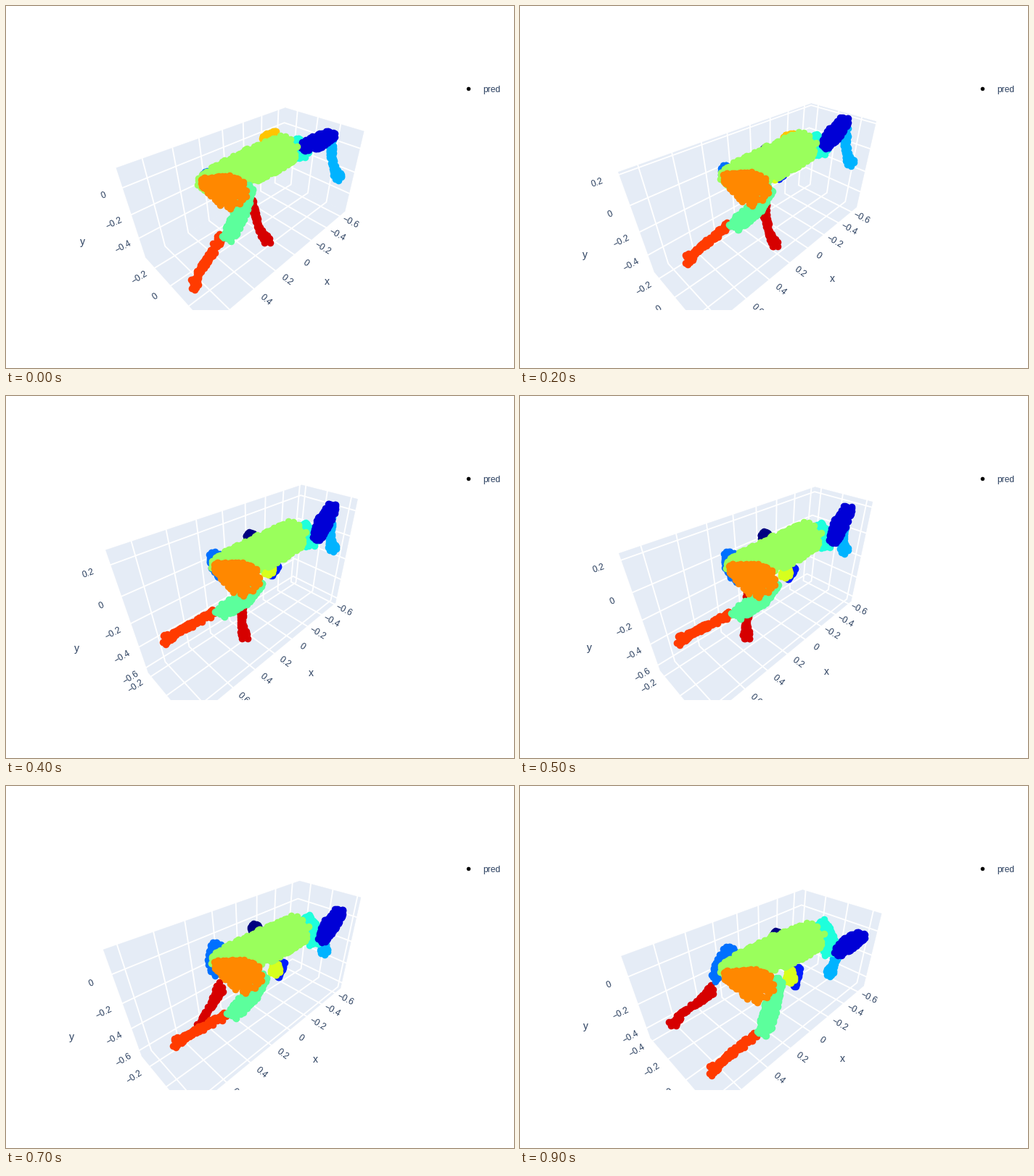
These frames come from a looping animation (700 px wide and 500 px high, 1 s). A matplotlib script:

```python
import numpy as np
import matplotlib.pyplot as plt
from matplotlib.animation import FuncAnimation

WIDTH, HEIGHT, DPI = 700, 500, 100
PX = 72 / DPI                               # points per pixel
FRAMES, INTERVAL = 10, 100
LEFT, TOP, RIGHT, BOTTOM = 80, 100, 606, 420  # plot viewport
CENTER = np.array([343, 260])
FOCAL = 160 / np.tan(np.pi / 8)
EYE_DISTANCE = 1.25 * np.sqrt(3)
VANISH_X, VANISH_Z = (816, -13), (-130, -13)
INK, WALL = "#2a3f5f", "#e5ecf6"
TICK_PAD, TITLE_PAD = 0.117, 0.325
MARKER = 9.6

plt.rcParams["font.family"] = "Liberation Sans"

# frame: half length, half height, and where x = 0 and y = 0 fall in the box
BOX = {
    0: (.797, .397, -.036, .252),
    2: (.884, .434, -.118, .195),
    4: (.869, .525, -.170, .208),
    7: (.889, .460, -.100, .292),
    9: (.858, .362, -.044, .210),
}

# colour, point count, radius at each joint, then the path of each joint as
# start, middle and end of its stroke; listed from back to front
PARTS = [
    ("navy", 40, (6,), [
        [(345, 215), (336, 194), (353, 206)]]),
    ("#ffc400", 60, (6, 6), [
        [(356, 184), (374, 187), (380, 215)],
        [(369, 176), (378, 186), (386, 213)]]),
    ("#d60000", 110, (8, 3, 2, 6.5), [
        [(330, 260), (325, 269), (266, 281)],
        [(341, 282), (324, 296), (247, 297)],
        [(349, 308), (325, 316), (225, 312)],
        [(361, 326), (329, 334), (209, 330)]]),
    ("#0070ff", 170, (10, 9, 6), [
        [(279, 236), (288, 222), (290, 228)],
        [(282, 242), (291, 236), (278, 244)],
        [(284, 248), (299, 250), (268, 266)]]),
    ("#00b3ff", 90, (4, 3, 3, 6.5), [
        [(448, 185), (448, 168), (436, 230)],
        [(448, 207), (446, 188), (433, 243)],
        [(453, 226), (448, 203), (429, 252)],
        [(458, 237), (450, 211), (426, 258)]]),
    ("#001eff", 40, (3, 3), [
        [(350, 225), (373, 234), (383, 250)],
        [(345, 230), (366, 246), (379, 276)]]),
    ("#d7ff1e", 50, (4, 7), [
        [(340, 220), (364, 236), (372, 256)],
        [(335, 230), (361, 242), (372, 267)]]),
    ("#1effdc", 190, (8, 12.5), [
        [(400, 189), (410, 181), (416, 190)],
        [(407, 202), (420, 200), (427, 227)]]),
    ("#0000d6", 220, (7, 10.5, 6.5), [
        [(411, 194), (428, 195), (438, 229)],
        [(430, 187), (438, 173), (454, 216)],
        [(449, 177), (450, 151), (471, 206)]]),
    ("#9aff5c", 1100, (14, 24.5, 22), [
        [(276, 243), (295, 233), (288, 253)],
        [(334, 221), (349, 216), (352, 229)],
        [(383, 200), (394, 194), (400, 210)]]),
    ("#ff3b00", 130, (6, 4, 3, 7.5), [
        [(297, 318), (287, 298), (325, 344)],
        [(282, 343), (262, 312), (301, 361)],
        [(266, 366), (238, 324), (279, 379)],
        [(258, 387), (217, 337), (262, 394)]]),
    ("#5cff9c", 280, (6, 10.5, 9), [
        [(336, 250), (350, 256), (357, 268)],
        [(321, 287), (325, 282), (345, 304)],
        [(307, 319), (296, 298), (336, 340)]]),
    ("#ff8800", 330, (7, 24), [
        [(273, 243), (291, 236), (285, 261)],
        [(309, 257), (327, 253), (327, 276)]]),
]
STROKE_FRAMES = (0, 4, 9)


def scatter_rule(seed, count):
    """Fixed place of each point: along the limb, and around its axis."""
    rng = np.random.default_rng(seed)
    turn = rng.uniform(0, 2 * np.pi, count)
    reach = rng.uniform(0, 1, count) ** 0.38
    offset = np.column_stack([np.cos(turn), np.sin(turn)]) * reach[:, None]
    return rng.uniform(0, 1, count), offset


def along_limb(values, along):
    return np.interp(along, np.linspace(0, 1, len(values)), values)


def build_part(seed, part):
    color, count, radii, paths = part
    along, offset = scatter_rule(seed, count)
    return color, along, offset * along_limb(radii, along)[:, None], np.array(paths)


CLOUDS = [build_part(seed, part) for seed, part in enumerate(PARTS)]


def stroke(paths, i):
    """Joint positions on the parabolas through start, middle and end."""
    p, q, r = STROKE_FRAMES
    weights = [(i - q) * (i - r) / ((p - q) * (p - r)),
               (i - p) * (i - r) / ((q - p) * (q - r)),
               (i - p) * (i - q) / ((r - p) * (r - q))]
    return np.einsum("k,jkx->jx", weights, paths)


def project(x, y, z):
    depth = EYE_DISTANCE - (x + y + z) / np.sqrt(3)
    side = (z - x) / np.sqrt(2)
    rise = (2 * y - x - z) / np.sqrt(6)
    return CENTER + FOCAL / depth * np.array([side, -rise])


def ticks(zero, scale, half):
    """Pairs of (value, place) that lie inside one box axis."""
    places = [(n / 5, zero + scale * n / 5) for n in range(-6, 7)]
    return [(v, p) for v, p in places if abs(p) <= half + 0.012]


def label(point, text, size=12, toward=None):
    angle = 0
    if toward is not None:
        dx, dy = np.subtract(toward, point)
        angle = -np.degrees(np.arctan(dy / dx))
    ax.text(*point, text, color=INK, fontsize=size * PX, rotation=angle,
            ha="center", va="center", clip_on=True, zorder=3)


def draw_box(i):
    a, b, x0, y0 = (np.interp(i, list(BOX), column) for column in zip(*BOX.values()))
    c = 1 / (8 * a * b)                     # the box keeps unit volume
    drift = (i / FRAMES) ** 2
    scale, z0 = 1.108 + 0.065 * drift, -0.03 + 0.16 * drift
    faces = [
        [(a, b, -c), (-a, b, -c), (-a, -b, -c), (a, -b, -c)],
        [(-a, b, -c), (-a, b, c), (-a, -b, c), (-a, -b, -c)],
        [(a, -b, -c), (-a, -b, -c), (-a, -b, c), (a, -b, c)],
    ]
    for face in faces:
        ax.fill(*np.array([project(*p) for p in face]).T, color=WALL, lw=0.3, zorder=0)

    def grid(*path):
        ax.plot(*np.array([project(*p) for p in path]).T, color="white",
                lw=1.9 * PX, zorder=1)

    def tick_label(value, point, toward):
        text = f"{value:g}".replace("-", "\u2212")
        label(project(*point) + (-0.5, 1), text, toward=toward)

    for value, x in ticks(x0, scale, a):
        grid((x, b, -c), (x, -b, -c), (x, -b, c))
        tick_label(value, (x, -b, c + TICK_PAD), VANISH_Z)
    for value, y in ticks(y0, scale, b):
        grid((a, y, -c), (-a, y, -c), (-a, y, c))
        tick_label(value, (a + TICK_PAD, y, -c), VANISH_X)
    for value, z in ticks(z0, scale, c):
        grid((-a, b, z), (-a, -b, z), (a, -b, z))
        tick_label(value, (a + TICK_PAD, -b, z), VANISH_X)

    label(project(0, -b, c + TITLE_PAD), "x", 14)
    label(project(a + TITLE_PAD, 0, -c), "y", 14)


def draw_body(i):
    for color, along, offset, paths in CLOUDS:
        x, y = (along_limb(axis, along) for axis in stroke(paths, i).T)
        ax.scatter(x + offset[:, 0], y + offset[:, 1], s=(MARKER * PX) ** 2,
                   color=color, linewidths=0, zorder=2)


def draw(i):
    ax.clear()
    ax.set(xlim=(LEFT, RIGHT), ylim=(BOTTOM, TOP))
    ax.axis("off")
    draw_box(i)
    draw_body(i)
    return []


fig = plt.figure(figsize=(WIDTH / DPI, HEIGHT / DPI), dpi=DPI, facecolor="white")
ax = fig.add_axes([LEFT / WIDTH, 1 - BOTTOM / HEIGHT,
                   (RIGHT - LEFT) / WIDTH, (BOTTOM - TOP) / HEIGHT])

legend = fig.add_axes([0, 0, 1, 1], facecolor="none")
legend.set(xlim=(0, WIDTH), ylim=(HEIGHT, 0))
legend.axis("off")
legend.plot(637, 114, "o", color="black", ms=5.5 * PX, mew=0)
legend.text(657, 118.5, "pred", color=INK, fontsize=12 * PX, va="baseline")

anim = FuncAnimation(fig, draw, frames=FRAMES, interval=INTERVAL,
                     init_func=lambda: draw(0), repeat=True, repeat_delay=0)
plt.show()
```
